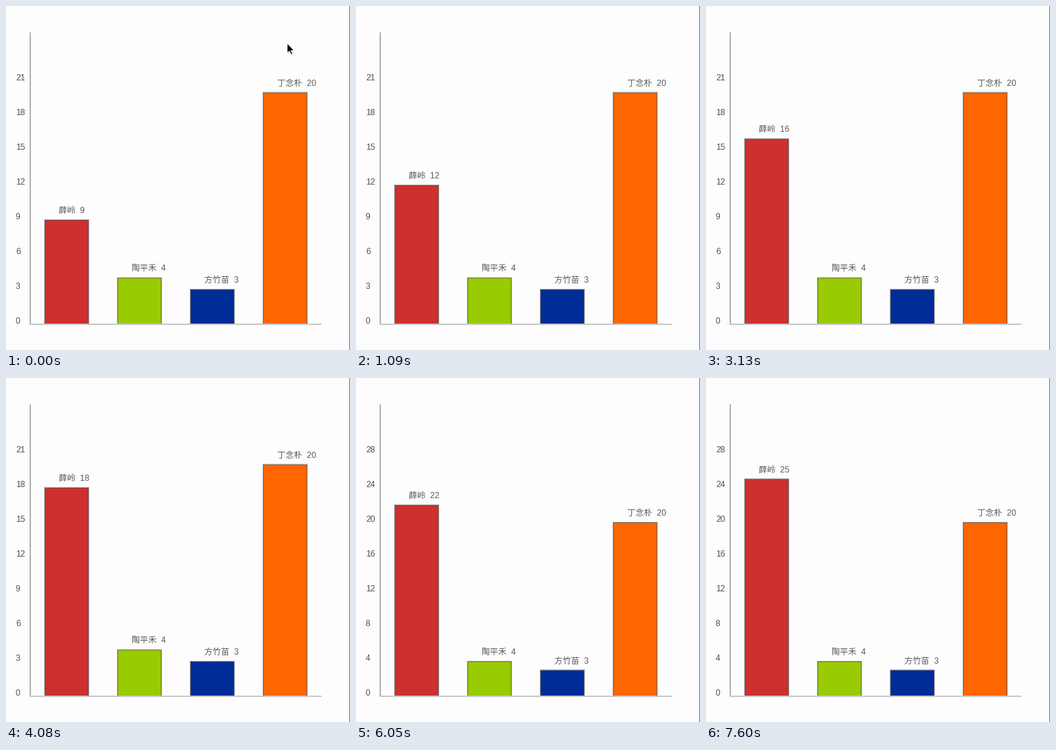
Animation, 496 px wide and 495 px high, one loop 8 s. Source, as a matplotlib script:

```python
import matplotlib.pyplot as plt
from matplotlib.animation import FuncAnimation
from matplotlib.patches import Polygon, Rectangle
from matplotlib.patheffects import Normal, withSimplePatchShadow

W, H, DPI = 496, 495, 100
STEP, LOOP = 20, 8000
PX = 72 / DPI  # points per pixel

BASE = 458     # y of the zero line
GRID = 50      # pixels between axis labels
INTERVALS = 7

CANDIDATES = [("薛岭", 9, "#cd302e"), ("陶平禾", 4, "#99cc00"),
              ("方竹苗", 3, "#002c98"), ("丁念朴", 20, "#ff6600")]

# The first bar gains one vote at a steady pace
FIRST_VOTE, VOTE_GAP = 50, 500

# The pointer leaves in two short moves, each redrawn a few times
STOPS = [(405.3, 53.5), (486, 409), (494, 500)]
MOVE_GAP, MOVE_STEPS, STEP_GAP = 690, 6, 60
ARROW = [(0, 0), (0, 14.5), (3.4, 11.4), (5.8, 16.6),
         (8, 15.6), (5.7, 10.5), (10.3, 10.5)]

plt.rcParams["font.family"] = ["Liberation Sans", "Noto Sans CJK JP"]
plt.rcParams["font.size"] = 12 * PX

fig = plt.figure(figsize=(W / DPI, H / DPI), dpi=DPI, facecolor="#fdfdfd")
ax = fig.add_axes([0, 0, 1, 1])
ax.set_xlim(0, W)
ax.set_ylim(H, 0)
ax.axis("off")


def line(xs, ys, color, width):
    ax.plot(xs, ys, color=color, lw=width * PX, solid_capstyle="butt",
            snap=False)


line([35, 35], [38, BASE + 1], "#b0b0b0", 2)
line([34, 455], [BASE, BASE], "#c8c8c8", 2)
line([495.5, 495.5], [0, H], "#777777", 1)

ticks = [ax.text(14, BASE - 1 - GRID * i, "", color="#505050")
         for i in range(INTERVALS + 1)]

bars, labels = [], []
for i, (_, _, color) in enumerate(CANDIDATES):
    x = 56 + 105 * i
    bar = Rectangle((x, BASE), 63, 0, facecolor=color, lw=2 * PX,
                    edgecolor=(0.3, 0.3, 0.3, 0.5), snap=False)
    bars.append(ax.add_patch(bar))
    labels.append(ax.text(x + 20, BASE, "", color="#5a5a5a"))

shadow = withSimplePatchShadow(offset=(0.5, -1), shadow_rgbFace="black",
                               alpha=0.2)
pointer = ax.add_patch(Polygon(ARROW, closed=True, facecolor="black",
                               edgecolor="white", lw=1 * PX, zorder=5,
                               path_effects=[shadow, Normal()]))


def pointer_at(t):
    pos = STOPS[0]
    for i, stop in enumerate(STOPS[1:]):
        elapsed = t - FIRST_VOTE - i * MOVE_GAP
        if elapsed >= 0:
            k = min(elapsed // STEP_GAP + 1, MOVE_STEPS) / MOVE_STEPS
            pos = [a + (b - a) * k for a, b in zip(STOPS[i], stop)]
    return pos


def update(frame):
    t = frame * STEP + STEP / 2
    values = [start for _, start, _ in CANDIDATES]
    if t >= FIRST_VOTE:
        values[0] += int((t - FIRST_VOTE) // VOTE_GAP) + 1

    # The axis unit grows when a bar passes the top label
    unit = -(-max(values) // INTERVALS)
    for i, tick in enumerate(ticks):
        tick.set_text(str(unit * i))

    for (name, _, _), value, bar, label in zip(CANDIDATES, values,
                                               bars, labels):
        height = value * GRID / unit
        bar.set_y(BASE - height)
        bar.set_height(height)
        label.set_text(f"{name}  {value}")
        label.set_y(BASE - height - 10)

    px, py = pointer_at(t)
    pointer.set_xy([(px + x, py + y) for x, y in ARROW])
    return [*ticks, *bars, *labels, pointer]


anim = FuncAnimation(fig, update, frames=LOOP // STEP, interval=STEP,
                     repeat=True, repeat_delay=0, blit=False)
plt.show()
```
